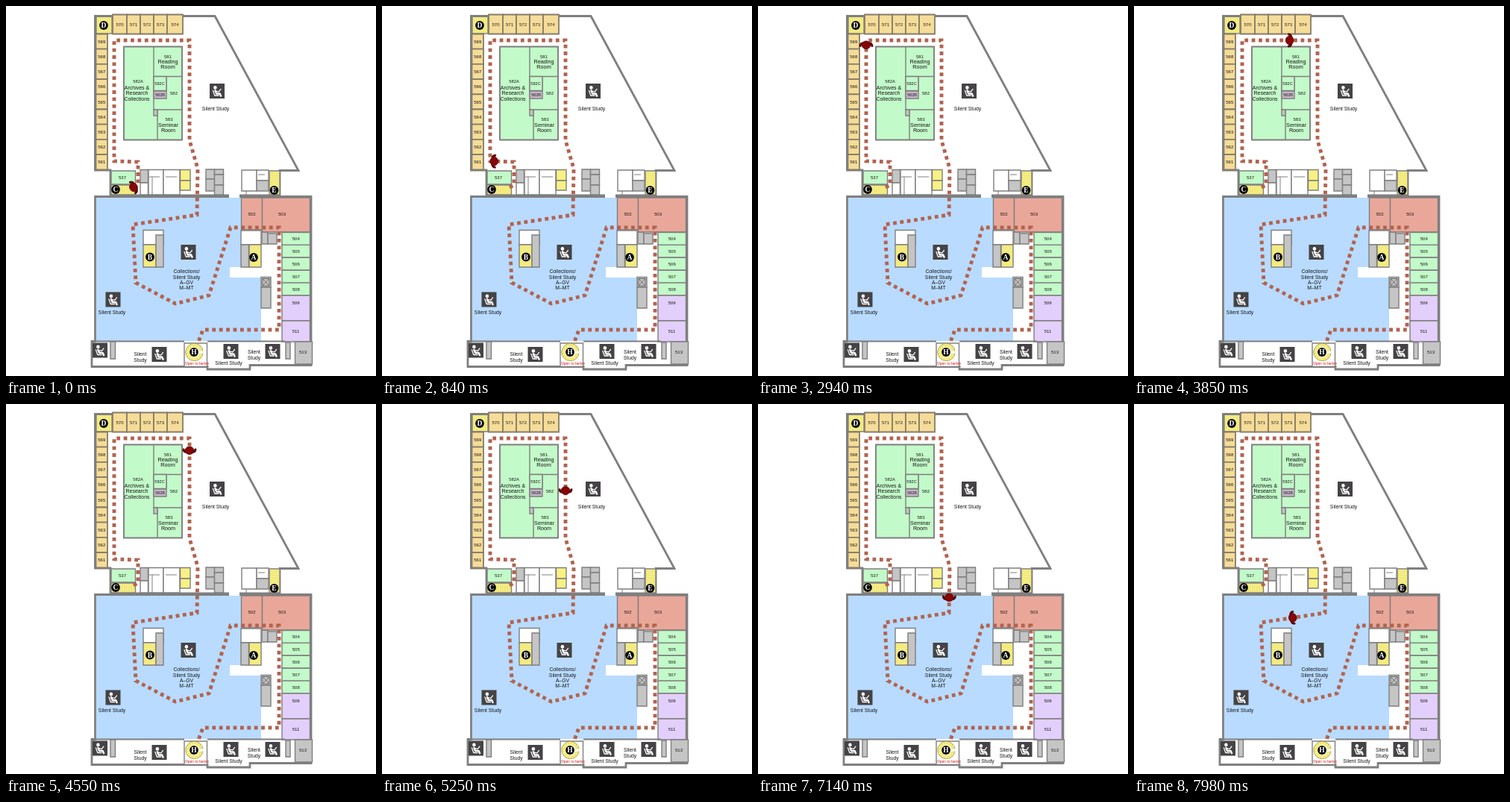
These frames come from a looping animation (496x496 px, 8000 ms). An HTML page:

```html
<!DOCTYPE html>
<html lang="en">
<head>
<meta charset="utf-8">
<title>Floor plan route</title>
<style>
  html, body { margin: 0; width: 100%; height: 100%; overflow: hidden; background: #fff; }
  svg { display: block; width: 100vw; height: 100vh; }
  text { font-family: "Liberation Sans", Arial, sans-serif; text-anchor: middle; fill: #161616; }
  .badge { font-family: "Liberation Serif", "Times New Roman", serif; font-weight: bold; fill: #fff; }
</style>
</head>
<body>
<svg id="plan" viewBox="0 0 496 496"></svg>
<script>
const LOOP = 8000, STEP = 70, SPEED = 0.0767;
const WALL = '#7f7f7f', GREY = '#c5c5c5', GREEN = '#c3fac9', ORANGE = '#f5dc98',
      YELLOW = '#f9f184', RED = '#e9a799', PURPLE = '#e3cffb', BLUE = '#b9dbff';

const svg = document.getElementById('plan');
const parts = [];
const add = markup => parts.push(markup);

const shape = (d, fill = 'none', stroke = WALL, width = 1.4) =>
  add(`<path d="${d}" fill="${fill}" stroke="${stroke}" stroke-width="${width}"/>`);
const box = (x1, y1, x2, y2, fill = '#fff', stroke = WALL, width = 1.4) =>
  shape(`M${x1} ${y1}H${x2}V${y2}H${x1}Z`, fill, stroke, width);
const label = (x, y, lines, size = 6, leading = 7.4, fill = '#161616') =>
  [].concat(lines).forEach((line, i) =>
    add(`<text x="${x}" y="${y + i * leading + size * 0.36}" font-size="${size}" style="fill:${fill}">${line}</text>`));
const room = (x1, y1, x2, y2, fill, name, stroke, width) => {
  box(x1, y1, x2, y2, fill, stroke, width);
  label((x1 + x2) / 2, (y1 + y2) / 2, name);
};

function stairs(x1, y1, x2, y2, vertical) {
  box(x1, y1, x2, y2, YELLOW);
  let d = '';
  if (vertical) for (let y = y1 + 3; y < y2; y += 3) d += `M${x1 + 1} ${y}H${x2 - 1}`;
  else for (let x = x1 + 3; x < x2; x += 3) d += `M${x} ${y1 + 1}V${y2 - 1}`;
  shape(d, 'none', '#d3c86c', 0.5);
}

function badge(x, y, letter) {
  add(`<circle cx="${x}" cy="${y}" r="5.9" fill="#050505"/>
    <text class="badge" x="${x}" y="${y + 3.2}" font-size="9.5">${letter}</text>`);
}

function readerIcon(x, y) {
  add(`<g transform="translate(${x} ${y})" stroke-linejoin="round" stroke-linecap="round">
    <rect x="-10" y="-10" width="20" height="20" fill="#454345"/>
    <circle cx="-2.6" cy="-4.6" r="2.3" fill="#fff"/>
    <path d="M-2.6 -.6L-.8 3.4H3.6L5 6.6" fill="none" stroke="#fff" stroke-width="2.5"/>
    <path d="M-1.5 .2L2.4 .8L5 -2.6M-5.6 -.6L-3.2 6H2" fill="none" stroke="#fff" stroke-width="1.3"/></g>`);
}

function upperFloor() {
  shape('M119.5 13.5H280L392 220.5H367V254H140V220H119.5Z', '#fff', WALL, 2.8);
  stairs(121, 14, 142, 37);
  [143, 162, 180, 198, 216, 237].forEach((x, i, xs) => {
    if (i < 5) room(x, 11.5, xs[i + 1], 37.5, ORANGE, 570 + i, '#857d68', 1.8);
  });
  for (let i = 0; i < 9; i++) {
    const y = 37.5 + i * 20.2;
    room(120.5, y, 136, y + 20.2, ORANGE, 569 - i, '#857d68', 1.8);
  }
  shape('M119.5 220V13.5H142', 'none', WALL, 2.8);

  box(158, 54.5, 236, 179.5, GREEN, WALL, 1.9);
  shape('M198 54V139H203V179M198 94.5H236M215 94V113M203 139H236');
  box(198, 94.5, 215, 113.5, GREEN);
  box(198, 114, 215, 124, '#c9b6cc');
  box(198, 139, 203, 147, GREY);
  label(177, 101, '582A', 5.8);
  label(175.5, 109.3, ['Archives &amp;', 'Research', 'Collections'], 7);
  label(217, 68, '581');
  label(217, 74.5, ['Reading', 'Room'], 7.3, 7.2);
  label(206, 104, '582C', 5.6);
  label(206.5, 119, '582B', 5.6);
  label(225, 117, '582');
  label(218.5, 152, '583');
  label(217.5, 159.5, ['Seminar', 'Room'], 7.2, 7.2);

  box(141, 221, 173.5, 239, GREEN);
  label(156, 229.5, '537');
  stairs(141, 240, 173.5, 253);
  box(180, 219.5, 190.5, 237, GREY);
  box(180, 237, 190.5, 253);
  box(191, 219.5, 211, 253);
  box(211, 219.5, 233, 253);
  shape('M192 229H206M196 229V253M214 229H229', 'none', WALL, 1);
  box(233.5, 219.5, 247, 234, YELLOW);
  box(233.5, 234, 247, 247, YELLOW);
  box(268, 219, 279.5, 232, GREY);
  box(268, 232, 279.5, 248, GREY);
  box(279.5, 219, 291.5, 226, GREY);
  box(279.5, 226, 291.5, 240, GREY);
  box(279.5, 240, 291.5, 253, GREY);
  box(316, 220, 336, 248);
  box(336, 220, 352, 234);
  box(336, 234, 352, 248, GREY);
  shape('M322 248V253M338 226H347', 'none', WALL, 1);
  stairs(353, 221, 367, 253, true);
}

function lowerFloor() {
  shape('M119.5 255.5H409V481.5H327V487H270V483.5H115V449.5H119.5Z', '#fff', WALL, 2.8);
  shape('M121 257H315V350H300V364H342V449H121Z', BLUE, 'none');
  shape('M299 254.5H313', 'none', '#fff', 5);

  box(184, 300.5, 211, 320);
  stairs(184, 320, 201, 350, true);
  box(201, 307, 211, 350, GREY);
  box(315, 301, 342, 320);
  box(315, 320, 325.5, 350, GREY);
  stairs(326, 320, 342, 350, true);
  box(343, 303, 351, 319, GREY);
  box(351, 305, 363, 319, GREY);

  room(315.5, 257, 343.5, 300, RED, '502');
  box(343.5, 257, 407.5, 303, RED);
  label(370, 279, '503');
  for (let i = 0; i < 5; i++) room(370, 303.5 + i * 16.9, 407.5, 320.4 + i * 16.9, GREEN, 504 + i);
  box(370, 388, 407.5, 422, PURPLE);
  label(388.5, 397.5, '509');
  box(370, 422, 407.5, 450, PURPLE);
  label(388.5, 436, '511');
  box(387.5, 450, 410.5, 480, GREY);
  label(398, 464, '513');

  box(342, 363.5, 355, 377, GREY);
  shape('M344 365.5H353V375H344ZL353 375M353 365.5L344 375', 'none', '#555', 0.8);
  box(342, 377, 355, 405, GREY);

  shape('M115 449.5H239M270 449.5H374', 'none', WALL, 1.8);
  box(140, 450, 146.5, 473, GREY);
  box(375, 451, 381, 473, GREY);
  box(239, 452, 269.5, 483.5);
  add(`<circle cx="252.5" cy="464" r="9.3" fill="none" stroke="${YELLOW}" stroke-width="5"/>
    <circle cx="252.5" cy="464" r="11.7" fill="none" stroke="#9b924d" stroke-width=".8"/>
    <circle cx="252.5" cy="464" r="9.3" fill="none" stroke="#d3c86c" stroke-width="4.5" stroke-dasharray=".5 2.9"/>`);
  shape('M256 464H266', 'none', '#fff', 3);
  label(256, 478.7, 'Open to below', 5, 0, '#d71920');
}

const route = 'M171 243L177 240V209L145 208V46H246V180L257 218L256 280L170 293';
const routeEnd = 'L174 371L227 399L272 388L301 297H366V434H264L258 450';

upperFloor();
lowerFloor();
[[283, 114], [244.5, 330], [143.5, 393.5], [126, 461.5], [205.5, 467], [301.5, 463], [357.5, 463]]
  .forEach(([x, y]) => readerIcon(x, y));
[[281, 138], [142, 410.5], [298.5, 479]].forEach(([x, y]) => label(x, y, 'Silent Study', 6.8));
[[180, 467], [332.5, 464]].forEach(([x, y]) => label(x, y, ['Silent', 'Study'], 6.8));
label(242, 355.7, ['Collections/', 'Silent Study', 'A–GV', 'M–MT'], 6.8);

add(`<path d="${route}${routeEnd}" fill="none" stroke="#b2634f" stroke-width="4.9" stroke-dasharray="4.8 4.6"/>`);
[[131, 26, 'D'], [147, 246, 'C'], [359.5, 247, 'E'], [193, 336.5, 'B'], [332, 337, 'A'], [252, 464, 'H']]
  .forEach(b => badge(...b));

add(`<path id="route" d="${route}" fill="none"/>
  <g id="walker">
    <path d="M-8 1.2Q-7.5 -2 -4 -2.4H4Q7.5 -2 8 1.2" fill="none" stroke="#5a0505"
      stroke-width="3" stroke-linecap="round"/>
    <ellipse rx="5.8" ry="5.3" fill="#8a0505" stroke="#4a0505" stroke-width=".8"/>
  </g>`);
svg.innerHTML = parts.join('');

const path = document.getElementById('route');
const walker = document.getElementById('walker');

function render(now) {
  const time = Math.floor((now % LOOP) / STEP) * STEP;
  const distance = time * SPEED;
  const at = path.getPointAtLength(distance);
  // A short chord around the current point turns the walker gradually at corners.
  const back = path.getPointAtLength(Math.max(0, distance - 4));
  const ahead = path.getPointAtLength(distance + 4);
  const heading = Math.atan2(ahead.y - back.y, ahead.x - back.x) * 180 / Math.PI + 90;
  walker.setAttribute('transform', `translate(${at.x} ${at.y}) rotate(${heading})`);
}

const start = performance.now();
function tick() {
  render(performance.now() - start);
  requestAnimationFrame(tick);
}
tick();
</script>
</body>
</html>
```
